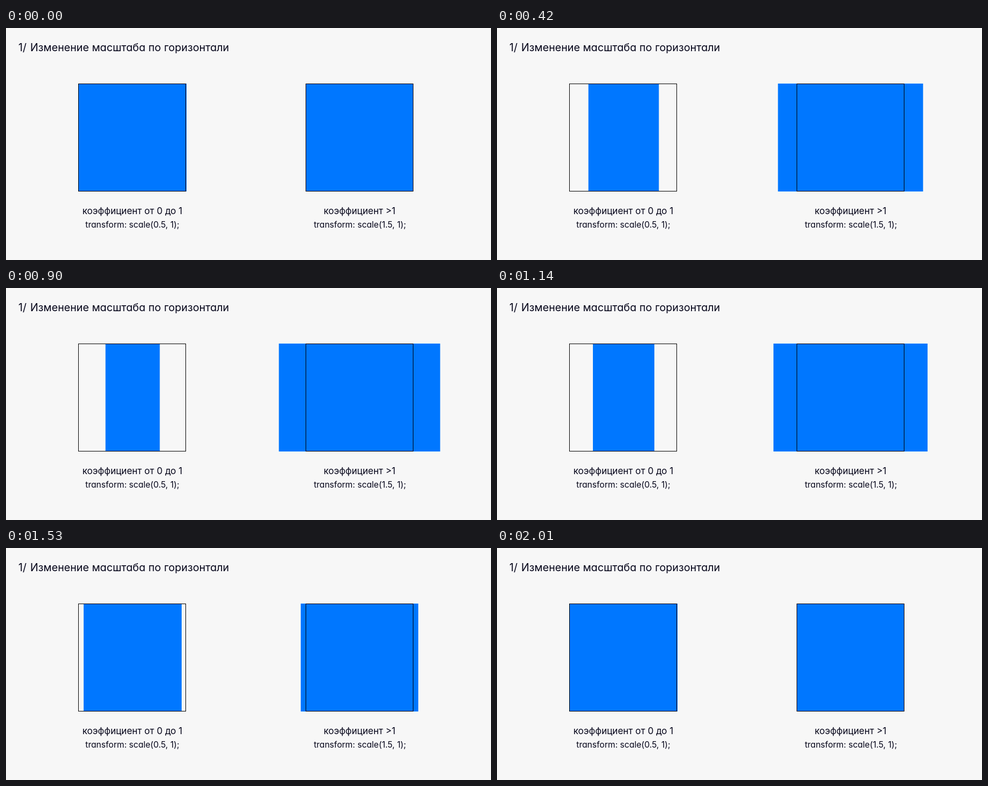
An HTML page for the animation above (2.04 s loop, 900 by 430 pixels).

```html
<!DOCTYPE html>
<html lang="ru">
<head>
<meta charset="utf-8">
<title>Изменение масштаба</title>
<style>
  html, body { margin: 0; width: 100%; height: 100%; overflow: hidden; background: #f7f7f7; }
  svg { display: block; }
  text { font-family: Inter, "Open Sans", sans-serif; font-feature-settings: "cv11"; fill: #05051a; }
  .title { font-size: 19.7px; }
  .note { font-size: 17px; text-anchor: middle; }
  .code { font-size: 15.6px; text-anchor: middle; }
  .fill { fill: #0077ff; }
  .frame { fill: none; stroke: #000; stroke-width: 1; }
</style>
</head>
<body>
<svg width="900" height="430" viewBox="0 0 900 430">
  <text class="title" x="23" y="43">1/<tspan dx="1.3"> Изменение масштаба по горизонтали</tspan></text>

  <rect class="fill" id="narrow" y="103" height="200"/>
  <rect class="frame" x="134.5" y="103.5" width="199" height="199"/>
  <text class="note" x="234.5" y="345">коэффициент от 0 до 1</text>
  <text class="code" x="234.5" y="370">transform: scale(0.5, 1);</text>

  <rect class="fill" id="wide" y="103" height="200"/>
  <rect class="frame" x="556.5" y="103.5" width="199" height="199"/>
  <text class="note" x="656" y="345">коэффициент &gt;1</text>
  <text class="code" x="656.8" y="370">transform: scale(1.5, 1);</text>
</svg>
<script>
  const LOOP = 2040, STEP = 30, DELAY = 13, HALF = 1000;
  const narrow = document.getElementById('narrow');
  const wide = document.getElementById('wide');

  const bezier = (a, b, u) => 3 * a * u * (1 - u) ** 2 + 3 * b * u * u * (1 - u) + u ** 3;

  // The CSS "ease" curve: cubic-bezier(.25, .1, .25, 1)
  function ease(x) {
    if (x <= 0) return 0;
    if (x >= 1) return 1;
    let lo = 0, hi = 1;
    for (let i = 0; i < 24; i++) {
      const mid = (lo + hi) / 2;
      if (bezier(0.25, 0.25, mid) < x) lo = mid; else hi = mid;
    }
    return bezier(0.1, 1, lo);
  }

  function setScale(rect, center, scale) {
    rect.setAttribute('x', center - 100 * scale);
    rect.setAttribute('width', 200 * scale);
  }

  function draw(time) {
    const t = Math.floor((time % LOOP) / STEP) * STEP - DELAY;
    const p = ease(t / HALF) - ease((t - HALF) / HALF);
    setScale(narrow, 235, 1 - p / 2);
    setScale(wide, 656, 1 + p / 2);
  }

  const start = performance.now();
  function tick() {
    draw(performance.now() - start);
    requestAnimationFrame(tick);
  }
  tick();
</script>
</body>
</html>
```
